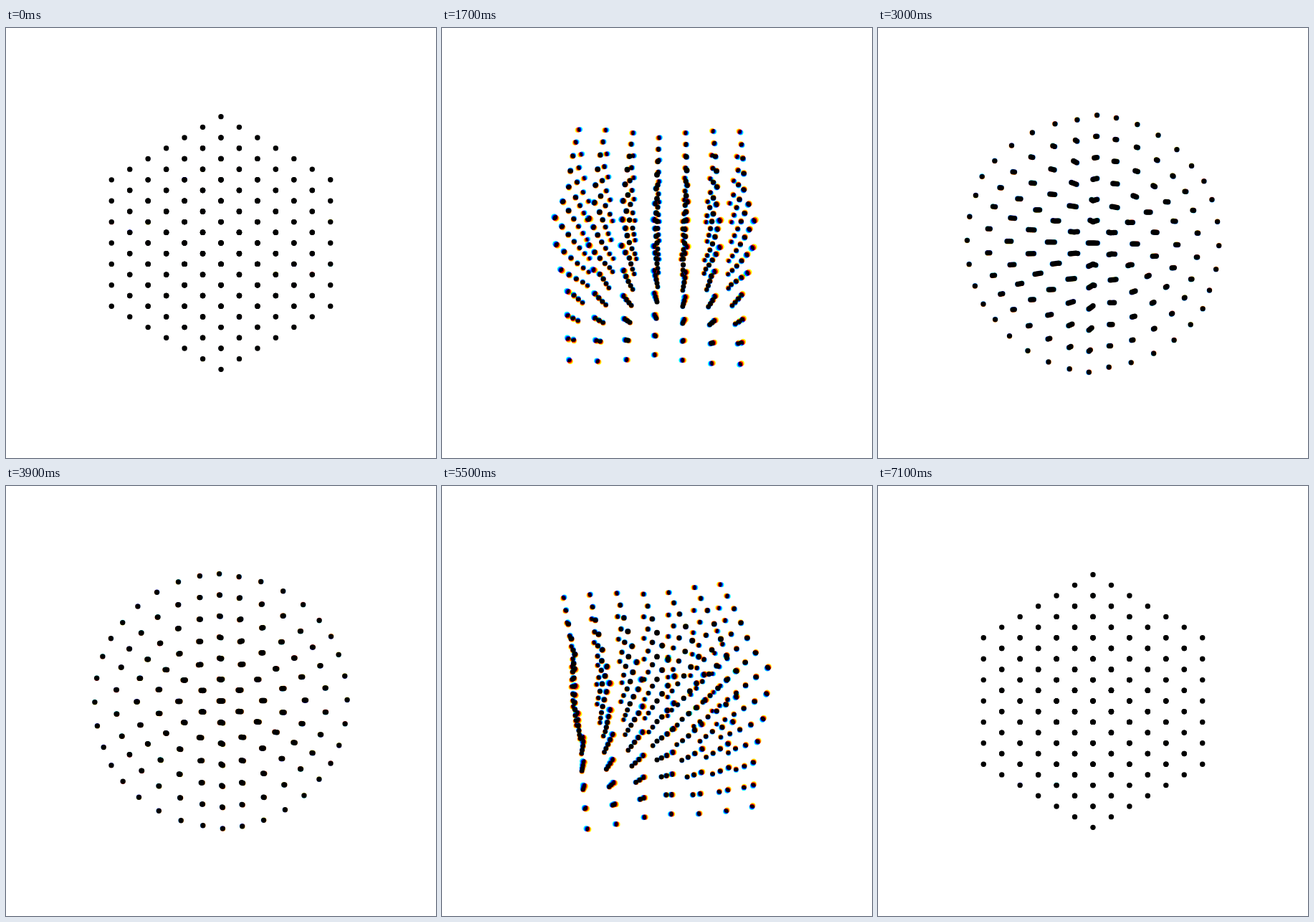
Write an HTML page with a canvas that moves like this. It is 600 px wide and 600 px high and loops after 7.2 s.

```html
<!DOCTYPE html>
<html>
<head>
<meta charset="utf-8">
<style>
  html, body { margin: 0; height: 100%; overflow: hidden; background: #fff; }
  canvas { display: block; }
</style>
</head>
<body>
<canvas id="stage" width="600" height="600"></canvas>
<script>
const ctx = document.getElementById('stage').getContext('2d');
const HALF = 3600, STEP = 100, PHASE = 75;
const SPACING = 36, DOT = 3.7, CAMERA = 850;
// Each ink darkens one colour channel, shown at a slightly different time.
const INKS = [['#0ff', -12], ['#f0f', 0], ['#ff0', 12]];

const ease = (x, p) => x < 0.5 ? 0.5 * (2 * x) ** p : 1 - 0.5 * (2 - 2 * x) ** p;

const lattice = [];
for (let a = -3; a <= 3; a++)
  for (let b = -3; b <= 3; b++)
    for (let c = -3; c <= 3; c++)
      lattice.push({
        a: a * SPACING,
        u: (b - c) * SPACING / Math.SQRT2,
        v: (b + c) * SPACING / Math.SQRT2
      });

// Size of the pointy-top hexagon through (x, y), measured to its corners
const hexRadius = (x, y) =>
  Math.max(Math.abs(x), Math.abs(x) / 2 + Math.abs(y) * Math.sqrt(0.75)) / Math.sqrt(0.75);

function drawCube(time) {
  const phase = time / HALF, x = phase % 1;
  const turn = ease(x, 2.5);
  const roundness = Math.floor(phase) % 2 ? 1 - turn : turn;
  const depth = ease(1 - Math.abs(2 * x - 1), 3.5) / CAMERA;
  const cos = Math.cos(turn * Math.PI / 2), sin = Math.sin(turn * Math.PI / 2);
  const long = Math.sqrt(2 / 3), short = Math.sqrt(1 / 3);

  for (const { a, u, v } of lattice) {
    const px = u * cos + v * sin;
    const pv = v * cos - u * sin;
    const py = short * pv - long * a;
    const pz = short * a + long * pv;
    const zoom = 1 / (1 - pz * depth);
    const r = Math.hypot(px, py) || 1;
    const scale = zoom * (1 + roundness * (hexRadius(px, py) / r - 1));
    ctx.beginPath();
    ctx.arc(300 + px * scale, 300 + py * scale, DOT * zoom, 0, 2 * Math.PI);
    ctx.fill();
  }
}

function render() {
  // Small lead so that a step is on screen by the time it is due
  const time = Math.floor((performance.now() + 25) / STEP) * STEP % (2 * HALF) + PHASE;
  ctx.globalCompositeOperation = 'source-over';
  ctx.fillStyle = '#fff';
  ctx.fillRect(0, 0, 600, 600);
  ctx.globalCompositeOperation = 'multiply';
  for (const [ink, offset] of INKS) {
    ctx.fillStyle = ink;
    drawCube(time + offset);
  }
  requestAnimationFrame(render);
}
render();
</script>
</body>
</html>
```
